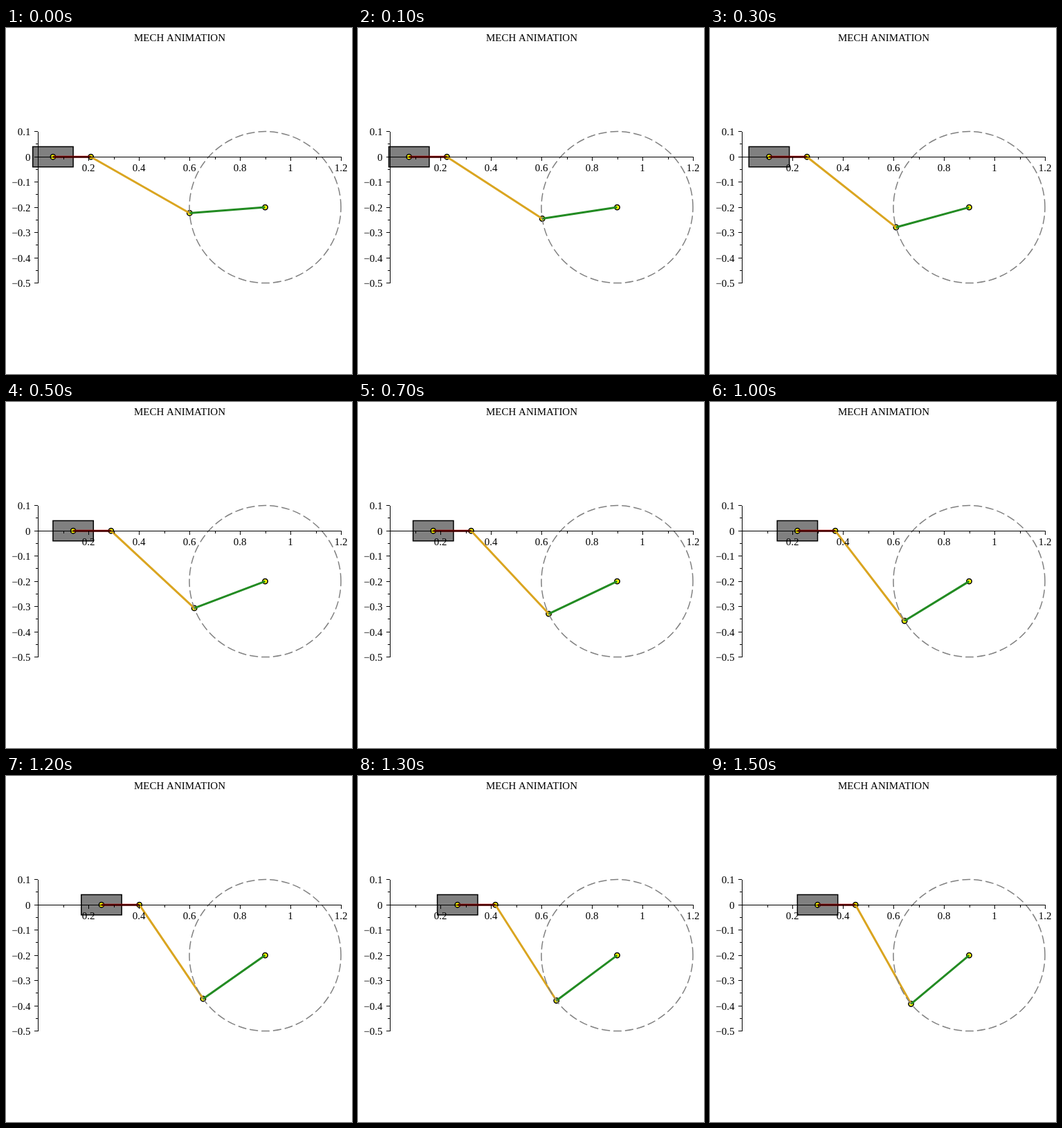
An HTML page with a canvas for the animation above (1.6 s loop, 500 px wide and 500 px high).

```html
<!DOCTYPE html>
<html>
<head>
<meta charset="utf-8">
<title>Mech animation</title>
<style>
  html, body { margin: 0; width: 100%; height: 100%; overflow: hidden; background: #fff; }
  canvas { display: block; }
</style>
</head>
<body>
<canvas id="stage" width="500" height="500"></canvas>
<script>
const ctx = document.getElementById('stage').getContext('2d');
const STEP_MS = 100, STEPS = 16;
const CRANK = 0.3, ROD = 0.45, ARM = 0.15;
const pivot = [0.9, -0.2];

// Plot units to pixels
const px = x => 46 + 365 * x;
const py = y => 186.2 - 364.5 * y;

function line(x1, y1, x2, y2) {
  ctx.beginPath();
  ctx.moveTo(x1, y1);
  ctx.lineTo(x2, y2);
  ctx.stroke();
}

function link(a, b, color) {
  ctx.strokeStyle = color;
  ctx.lineWidth = 3;
  line(px(a[0]), py(a[1]), px(b[0]), py(b[1]));
}

function pin([x, y]) {
  ctx.beginPath();
  ctx.arc(px(x), py(y), 3.7, 0, 2 * Math.PI);
  ctx.fillStyle = '#ff0';
  ctx.fill();
  ctx.strokeStyle = '#000';
  ctx.lineWidth = 1.5;
  ctx.stroke();
}

// Lower meeting point of the rod's reach and the crank circle
function crankPin([x, y]) {
  const dx = pivot[0] - x, dy = pivot[1] - y, d = Math.hypot(dx, dy);
  const along = (ROD ** 2 - CRANK ** 2 + d * d) / (2 * d);
  const side = Math.sqrt(ROD ** 2 - along ** 2);
  return [x + (along * dx + side * dy) / d, y + (along * dy - side * dx) / d];
}

function drawAxes() {
  ctx.strokeStyle = ctx.fillStyle = '#000';
  ctx.lineWidth = 1;
  ctx.font = '15px "Liberation Serif", serif';
  ctx.textAlign = 'center';
  ctx.fillText('MECH ANIMATION', 251, 19);
  line(46, 186.5, 484.5, 186.5);
  line(46.5, 150, 46.5, 369);
  for (let i = 1; i <= 12; i++) {
    const x = Math.round(px(i / 10)) + 0.5, major = i % 2 === 0;
    line(x, 186, x, major ? 192 : 190);
    if (major) ctx.fillText(String(i / 10), px(i / 10), 207);
  }
  ctx.textAlign = 'right';
  for (let i = -10; i <= 2; i++) {
    const y = Math.floor(py(i / 20)) + 0.5, major = i % 2 === 0;
    line(major ? 41 : 43, y, 46, y);
    if (major) ctx.fillText(String(i / 20).replace('-', '\u2212'), 35.5, y + 5);
  }
}

function draw(step) {
  const slider = [0.06 + 0.016 * step, 0];
  const joint = [slider[0] + ARM, 0];
  const crank = crankPin(joint);

  ctx.clearRect(0, 0, 500, 500);
  ctx.fillStyle = '#808080';
  ctx.strokeStyle = '#000';
  ctx.lineWidth = 1.5;
  ctx.beginPath();
  ctx.rect(px(slider[0] - 0.08), py(0.04), 0.16 * 365, 0.08 * 364.5);
  ctx.fill();
  ctx.stroke();

  [slider, joint, crank, pivot].forEach(pin);
  link(slider, joint, '#8b0000');
  link(joint, crank, '#daa520');
  link(crank, pivot, '#228b22');

  ctx.strokeStyle = '#808080';
  ctx.lineWidth = 1.5;
  ctx.setLineDash([12, 5]);
  ctx.beginPath();
  ctx.arc(px(pivot[0]), py(pivot[1]), CRANK * 365, 0, -2 * Math.PI, true);
  ctx.stroke();
  ctx.setLineDash([]);

  drawAxes();
}

function tick() {
  draw(Math.floor(performance.now() / STEP_MS) % STEPS);
  requestAnimationFrame(tick);
}
tick();
</script>
</body>
</html>
```
